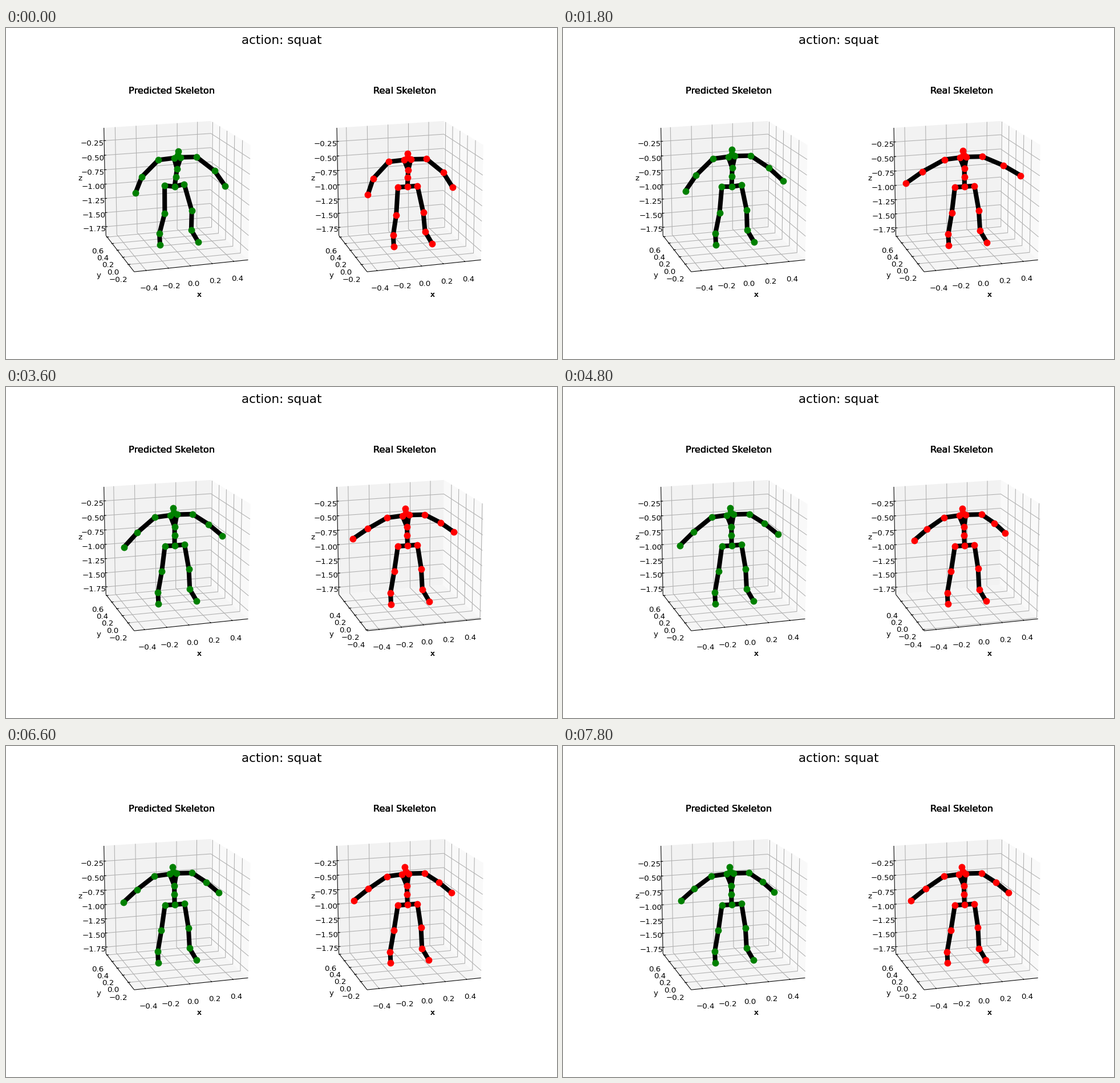
A matplotlib script for the animation above (8 s loop, 966x580 px).

```python
import numpy as np
import matplotlib.pyplot as plt
from matplotlib.animation import FuncAnimation
from matplotlib.collections import LineCollection, PolyCollection

W, H = 966, 580
DPI = 72                      # one point is one pixel
PT = 96.6 / 72                # pixels per nominal point
INTERVAL, FRAMES, HOLD = 200, 40, 3

# Camera looking at a cube of edge 1; EDGE is the padded half width.
AZIM, ELEV = np.radians([-107, 15.8])
CA, SA, CE, SE = np.cos(AZIM), np.sin(AZIM), np.cos(ELEV), np.sin(ELEV)
RIGHT = np.array([-SA, CA, 0])
UP = np.array([-SE * CA, -SE * SA, CE])
TOWARD = np.array([CE * CA, CE * SA, SE])
CENTER = np.array([295.5, 288.3])
CUBE, ZOOM, DIST = 1.0562, 1839.4, 10
EDGE, PAD = 25 / 48, 0.0907
TICK_OUT, TICK_IN = 0.1 / 12, 0.2 / 12
LABEL_DROP = 1.3

# step, half range and decimals of the x, y and z axes
AXES = [(0.2, 0.5, 1), (0.2, 0.5, 1), (0.25, 0.9, 2)]
LIMIT_KEYS = (0, 4, 8, 12)

# Standing pose in pixels from the pelvis, shared by both figures.
PELVIS = np.array([295.5, 278])
STANDING = {
    "hips": {"hip_l": (-16.8, 1), "hip_r": (17.5, -1.5)},
    "knees": {"knee_l": (-23.2, 45), "knee_r": (24.2, 40.5)},
    "shins": {"ankle_l": (-29.5, 82.5), "foot_l": (-28.5, 102.3),
              "ankle_r": (26.3, 76.5), "foot_r": (38.5, 97.2)},
    "torso": {"spine": (-0.3, -18), "chest": (-0.5, -33.5), "head": (-3.5, -66.3),
              "collar_l": (-8.7, -53.7), "collar_r": (3, -55),
              "shoulder_l": (-35.5, -50), "shoulder_r": (30.5, -55.7)},
}
CHAINS = ["root spine chest neck head",
          *(f"chest collar_{s} shoulder_{s} elbow_{s} wrist_{s}" for s in "lr"),
          *(f"root hip_{s} knee_{s} ankle_{s} foot_{s}" for s in "lr")]
# Elbow offset from the middle of the arm: at rest, and extra width when bent
ELBOWS = {"l": ((-3, 0.7), -6), "r": ((1.5, -1), 5)}

# shift: first and last offset of each body part from the standing pose
# limits: middle of the x, y and z ranges; wrists: path points at the given poses
PREDICTED = dict(
    title="Predicted Skeleton", color="green", dx=0,
    shift={"torso": ((9.5, 4.3), (0, 0)), "hips": ((-0.6, -3), (0, 0)),
           "knees": ((6, 1.5), (0, 0)), "shins": ((3, -0.3), (0, 0))},
    limits=[(0.0145, 0.036, 0.021, 0.021), (0.128, 0.112, 0.112, 0.130),
            (-0.970, -0.954, -0.943, -0.922)],
    wrist_keys=(0, 3, 5, 8, 13),
    wrists={"l": [(-68.5, 11), (-81, 7.5), (-87.5, 4), (-91, 0), (-88.5, -7)],
            "r": [(88.5, -1.5), (90.5, -10), (85, -16), (81, -20), (74.5, -22)]})

REAL = dict(
    title="Real Skeleton", color="red", dx=408.34,
    shift={"torso": ((3.5, 8.5), (-1, 0.5)), "hips": ((0, 0), (0, 0)),
           "knees": ((3.5, 4.5), (-0.6, -0.5)), "shins": ((4.5, 2.3), (-1, 0))},
    limits=[(0.031, 0.014, 0.014, 0.014), (0.130, 0.102, 0.090, 0.108),
            (-0.957, -0.944, -0.942, -0.934)],
    wrist_keys=(0, 3, 5, 8, 10),
    wrists={"l": [(-69.5, 14), (-102.5, -6), (-99.5, -13), (-88, -9.5), (-94.3, -7)],
            "r": [(79, 1), (98.5, -19.5), (85.5, -25.5), (71.5, -22), (77, -21)]})

plt.rcParams["font.family"] = "DejaVu Sans"
fig = plt.figure(figsize=(W / DPI, H / DPI), dpi=DPI, facecolor="white")
ax = fig.add_axes([0, 0, 1, 1])
ax.set_xlim(0, W)
ax.set_ylim(H, 0)
ax.axis("off")


def project(points, dx):
    """Cube coordinates to stage pixels."""
    p = np.asarray(points, float) * CUBE
    scale = ZOOM / (DIST - p @ TOWARD)
    return np.stack([CENTER[0] + dx + p @ RIGHT * scale,
                     CENTER[1] - p @ UP * scale], axis=-1)


def write(x, y, text, size=10, va="baseline", times=1):
    # Repeated drawing thickens the smoothed edges of the letters.
    return [ax.text(x, y, text, fontsize=size * PT, color="black", ha="center",
                    va=va, zorder=4) for _ in range(times)]


def draw_box(panel):
    dx, e = panel["dx"], EDGE
    panes = [([(e, -e, -e), (e, e, -e), (e, e, e), (e, -e, e)], 0.975),
             ([(-e, e, -e), (e, e, -e), (e, e, e), (-e, e, e)], 0.95),
             ([(-e, -e, -e), (e, -e, -e), (e, e, -e), (-e, e, -e)], 0.9625)]
    ax.add_collection(PolyCollection([project(q, dx) for q, _ in panes],
                                     facecolors=[str(g) for _, g in panes],
                                     edgecolors="none", zorder=1))
    front, right = (-e, -e, -e), (e, -e, -e)
    back, top = (-e, e, -e), (-e, e, e)
    edges = [(front, right), (front, back), (back, top)]
    ax.add_collection(LineCollection([project(s, dx) for s in edges], colors="black",
                                     linewidths=0.8 * PT, zorder=3))
    write(290.9 + dx, 114.7, panel["title"], 12, times=4)
    write(339 + dx, 471, "x", times=4)
    write(162.3 + dx, 437, "y")
    write(129.8 + dx, 266.8, "z")


def tick_shape(axis, t):
    """Grid line, tick mark and label anchor for one value."""
    e, far = EDGE, EDGE + PAD
    out, inn = -e - TICK_OUT, -e + TICK_IN
    if axis == 0:
        return ([(t, -e, -e), (t, e, -e), (t, e, e)],
                [(t, out, -e), (t, inn, -e)], (t, -far, -far))
    if axis == 1:
        return ([(-e, t, -e), (e, t, -e), (e, t, e)],
                [(out, t, -e), (inn, t, -e)], (-far, t, -far))
    return ([(-e, e, t), (e, e, t), (e, -e, t)],
            [(out, e, t), (inn, e, t)], (-far, far, t))


def draw_ticks(panel, pose):
    dx, grid, marks, made = panel["dx"], [], [], []
    for axis, (step, half, digits) in enumerate(AXES):
        mid = np.interp(pose, LIMIT_KEYS, panel["limits"][axis])
        first = int(np.ceil((mid - half) / step))
        last = int(np.floor((mid + half) / step))
        for k in range(first, last + 1):
            line, mark, spot = tick_shape(axis, (k * step - mid) / (2 * half))
            grid.append(project(line, dx))
            marks.append(project(mark, dx))
            x, y = project(spot, dx)
            label = f"{k * step:.{digits}f}".replace("-", "\u2212")
            made += write(x, y + LABEL_DROP, label, va="top")
    for lines, color, z in ((grid, "#b0b0b0", 2), (marks, "black", 3)):
        made.append(ax.add_collection(LineCollection(
            lines, colors=color, linewidths=0.8 * PT, zorder=z)))
    return made


def joints_at(panel, pose):
    """Joint positions relative to the pelvis."""
    bent = np.exp(-pose / 3)
    joints = {"root": np.zeros(2)}
    for part, places in STANDING.items():
        start, end = np.array(panel["shift"][part])
        shift = end + (start - end) * bent
        for name, place in places.items():
            # The torso leans more the higher it gets.
            share = -place[1] / 66 if part == "torso" else 1
            joints[name] = place + shift * share
    joints["neck"] = (joints["collar_l"] + joints["collar_r"]) / 2 + (0.5, -4)
    for side, (offset, widen) in ELBOWS.items():
        path = zip(*panel["wrists"][side])
        wrist = np.array([np.interp(pose, panel["wrist_keys"], c) for c in path])
        middle = (joints[f"shoulder_{side}"] + wrist) / 2
        joints[f"elbow_{side}"] = middle + offset + (widen * bent, 0)
        joints[f"wrist_{side}"] = wrist
    return joints


def draw_body(panel, pose):
    origin = PELVIS + (panel["dx"], 0)
    joints = {name: origin + p for name, p in joints_at(panel, pose).items()}
    chains = [chain.split() for chain in CHAINS]
    bones = [(joints[a], joints[b]) for c in chains for a, b in zip(c, c[1:])]
    lines = ax.add_collection(LineCollection(bones, colors="black",
                                             linewidths=6 * PT, zorder=5))
    dots = ax.scatter(*np.array(list(joints.values())).T, s=140, linewidths=0,
                      color=panel["color"], zorder=6)
    return [lines, dots]


live = []


def update(frame):
    while live:
        live.pop().remove()
    pose = frame // HOLD
    for panel in (PREDICTED, REAL):
        live.extend(draw_ticks(panel, pose) + draw_body(panel, pose))
    return live


write(W / 2, 0.02 * H, "action: squat", 16, va="top")
for panel in (PREDICTED, REAL):
    draw_box(panel)

anim = FuncAnimation(fig, update, frames=FRAMES, interval=INTERVAL,
                     init_func=lambda: update(0), repeat=True, blit=False)
plt.show()
```
